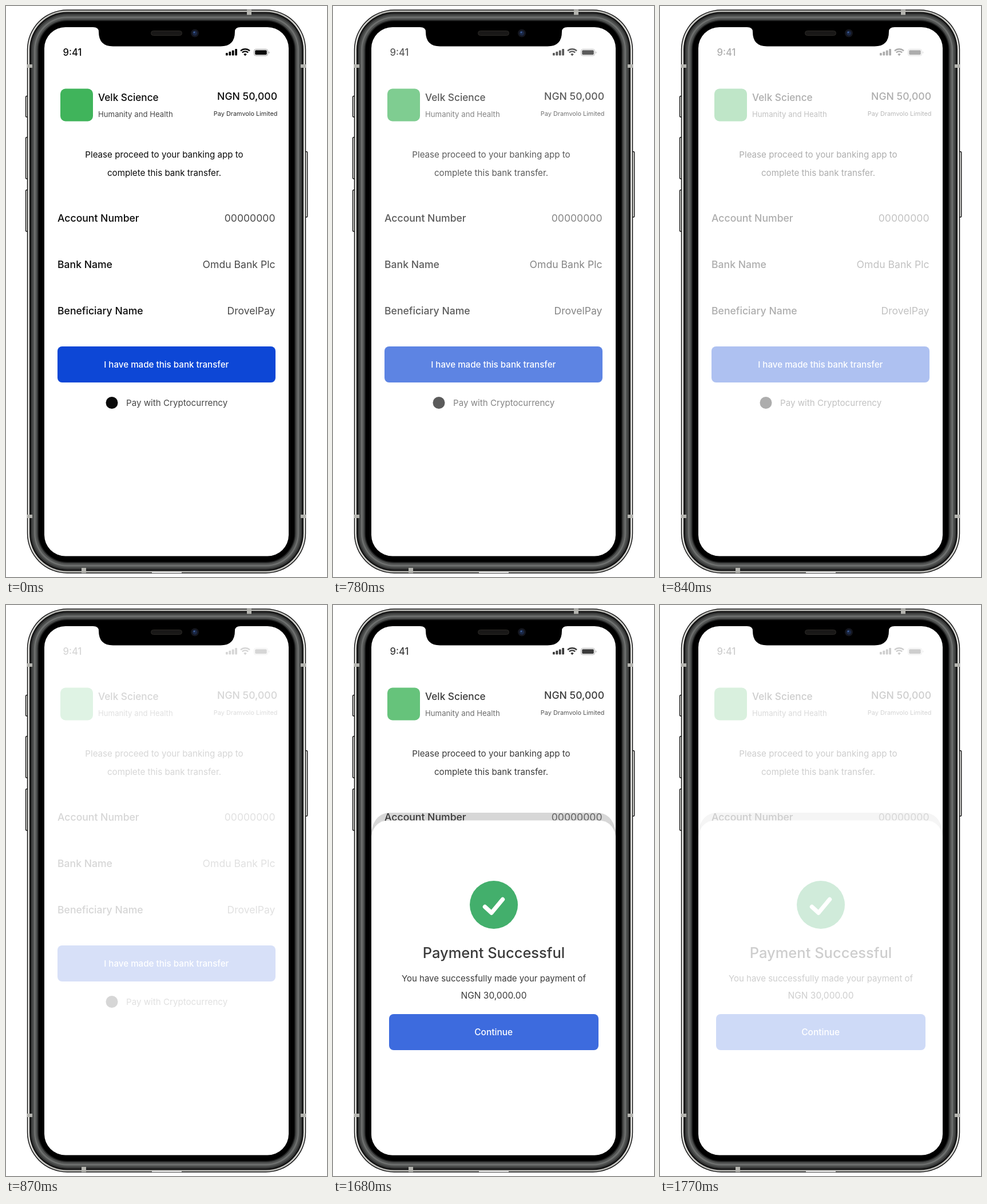
Write an HTML page that moves like this. It is 561 by 998 pixels and loops after 1800 ms.

```html
<!DOCTYPE html>
<html lang="en">
<head>
<meta charset="utf-8">
<title>Bank transfer</title>
<style>
  html, body { margin: 0; width: 100%; height: 100%; overflow: hidden; background: #fff; }
  svg { display: block; width: 561px; height: 998px; }
  text { font: 400 15.15px Inter, sans-serif; font-optical-sizing: none; fill: #0a0a0a; }
  .end { text-anchor: end; }
  .mid { text-anchor: middle; }
  .strong { font-weight: 550; }
  .row { font-size: 17.6px; }
  .soft { fill: #484848; }
  .white { fill: #fff; }
  .blue { fill: #0d47d6; }
  #sheet { opacity: 0; }
</style>
</head>
<body>
<svg viewBox="0 0 561 998">
  <defs>
    <clipPath id="glass"><rect x="67" y="37" width="427" height="924.5" rx="37"/></clipPath>
    <linearGradient id="rim" x2="0" y2="1">
      <stop offset="0" stop-color="#b8b8b4"/><stop offset=".06" stop-color="#e8e8e5"/>
      <stop offset=".94" stop-color="#e8e8e5"/><stop offset="1" stop-color="#b8b8b4"/>
    </linearGradient>
  </defs>

  <g fill="#e4e4e0" stroke="#161616" stroke-width="1.4">
    <rect x="34.5" y="157.5" width="5" height="36.5" rx="1.8"/>
    <rect x="34.5" y="229.5" width="5" height="72.5" rx="1.8"/>
    <rect x="34.5" y="321.5" width="5" height="72.5" rx="1.8"/>
    <rect x="521.7" y="254.5" width="5" height="114.5" rx="1.8"/>
  </g>
  <g id="body"></g>
  <g fill="#b4b4af">
    <rect x="421" y="6.5" width="8" height="9"/>
    <rect x="132" y="982" width="8" height="9"/>
    <rect x="37" y="102" width="9" height="6"/>
    <rect x="515" y="102" width="9" height="6"/>
    <rect x="37" y="889" width="9" height="6"/>
    <rect x="515" y="889" width="9" height="6"/>
    <rect x="255" y="989" width="52" height="2" fill="#eee"/>
  </g>

  <g clip-path="url(#glass)">
    <rect x="67" y="37" width="427" height="925" fill="#fff"/>
    <g id="screen">
      <text x="99.5" y="87" class="strong" style="font-size:16.6px">9:41</text>
      <g fill="#0a0a0a">
        <rect x="384" y="82" width="3.8" height="4.5" rx="1"/>
        <rect x="389.4" y="79.8" width="3.8" height="6.7" rx="1"/>
        <rect x="394.8" y="77.4" width="3.8" height="9.1" rx="1"/>
        <rect x="400.2" y="75" width="3.8" height="11.5" rx="1"/>
        <path d="M418 87.2l-2.7-2.8a3.9 3.9 0 0 1 5.4 0z"/>
        <path d="M412.8 81.4a7.6 7.6 0 0 1 10.4 0M410 78.4a11.7 11.7 0 0 1 16 0" fill="none" stroke="#0a0a0a" stroke-width="2.3"/>
        <rect x="433.5" y="75.5" width="24" height="11.4" rx="3.2" fill="none" stroke="#a0a0a0"/>
        <rect x="435.2" y="77.2" width="20.6" height="8" rx="1.6"/>
        <path d="M459 79.2q3 2 0 4z" fill="#a0a0a0"/>
      </g>

      <rect x="95" y="144.5" width="57" height="57" rx="9" fill="#40b45b"/>
      <text x="161" y="166" class="strong" style="font-size:17.2px">Velk Science</text>
      <text x="161" y="193.5" class="soft" style="font-size:13.2px">Humanity and Health</text>
      <text x="474" y="164" class="strong end" style="font-size:17.6px">NGN 50,000</text>
      <text x="474.5" y="191.5" class="end" style="font-size:10.9px;fill:#2c2c2c">Pay Dramvolo Limited</text>

      <text x="276.5" y="264.5" class="mid">Please proceed to your banking app to</text>
      <text x="276.5" y="296.5" class="mid">complete this bank transfer.</text>

      <text x="90" y="376.7" class="row strong">Account Number</text>
      <text x="470.5" y="376.7" class="row soft end">00000000</text>
      <text x="90" y="458" class="row strong">Bank Name</text>
      <text x="470.5" y="458" class="row soft end">Omdu Bank Plc</text>
      <text x="90" y="539.3" class="row strong">Beneficiary Name</text>
      <text x="470.5" y="539.3" class="row soft end">DrovelPay</text>

      <rect x="90" y="595" width="381" height="63" rx="8" class="blue"/>
      <text x="280.3" y="631.7" class="strong mid white">I have made this bank transfer</text>
      <circle cx="185" cy="693.5" r="10.5" fill="#0a0a0a"/>
      <text x="210" y="699" class="soft">Pay with Cryptocurrency</text>

      <g id="sheet">
        <path d="M67 962V394Q74 363 100 363H461Q487 363 494 394V962z" fill-opacity=".2"/>
        <path d="M67 962V404Q72 376.5 98 376.5H463Q489 376.5 494 404V962z" fill="#fff"/>
        <circle cx="281" cy="524" r="42" fill="#159c48"/>
        <path d="M265.5 527.5L277 538L296.5 514.5" fill="none" stroke="#fff" stroke-width="7.4" stroke-linecap="round" stroke-linejoin="round"/>
        <text x="281" y="616.5" class="strong mid" style="font-size:25.5px">Payment Successful</text>
        <text x="281" y="657.8" class="mid" style="font-size:15px">You have successfully made your payment of</text>
        <text x="281" y="687.7" class="mid" style="font-size:15.5px">NGN 30,000.00</text>
        <rect x="98" y="715" width="366" height="63" rx="8" class="blue"/>
        <text x="280.7" y="752" class="strong mid white" style="font-size:15.5px">Continue</text>
      </g>
    </g>
  </g>

  <path d="M152 35V37Q162 37 162 45Q162 70.5 187 70.5H375Q400 70.5 400 45Q400 37 410 37V35z"/>
  <rect x="253.5" y="43.5" width="54" height="8" rx="4" fill="#191817" stroke="#2b2926"/>
  <circle cx="330" cy="47.5" r="7" fill="#14161e"/>
  <circle cx="330" cy="47.5" r="4.2" fill="#1a2744"/>
  <circle cx="329" cy="46" r="1.5" fill="#3f609c"/>
</svg>
<script>
  // Concentric rims of the phone body: inset from the outer edge, colour.
  const rims = [
    [0, '#141414'], [1.5, 'url(#rim)'], [4.2, '#111'], [6.5, '#343535'],
    [9, '#4c4e4d'], [12, '#6c6e6d'], [15, '#505251'], [18, '#262727'], [20, '#000']
  ];
  document.getElementById('body').innerHTML = rims.map(([inset, color]) =>
    `<rect x="${36.8 + inset}" y="${6.3 + inset}" width="${487.4 - 2 * inset}"
      height="${985.4 - 2 * inset}" rx="${70 - inset}" fill="${color}"/>`).join('');

  const LOOP = 1800;

  // Plays [time, opacity] pairs as hard steps, holding the last value to the end.
  function playSteps(id, steps) {
    const last = steps[steps.length - 1][1];
    const frames = [...steps, [LOOP, last]].map(([time, opacity]) =>
      ({ offset: time / LOOP, opacity, easing: 'steps(1, end)' }));
    document.getElementById(id).animate(frames, { duration: LOOP, iterations: Infinity })
      .startTime = 0;
  }

  // Even fade in 30 ms steps.
  const fade = (start, count) => Array.from({ length: count }, (_, i) =>
    [start + 30 * i, 1 - (i + 1) / (count + 1)]);

  playSteps('screen', [[0, 1], ...fade(750, 5), [900, 1], ...fade(1680, 4)]);
  playSteps('sheet', [[0, 0], [900, 1]]);
</script>
</body>
</html>
```
